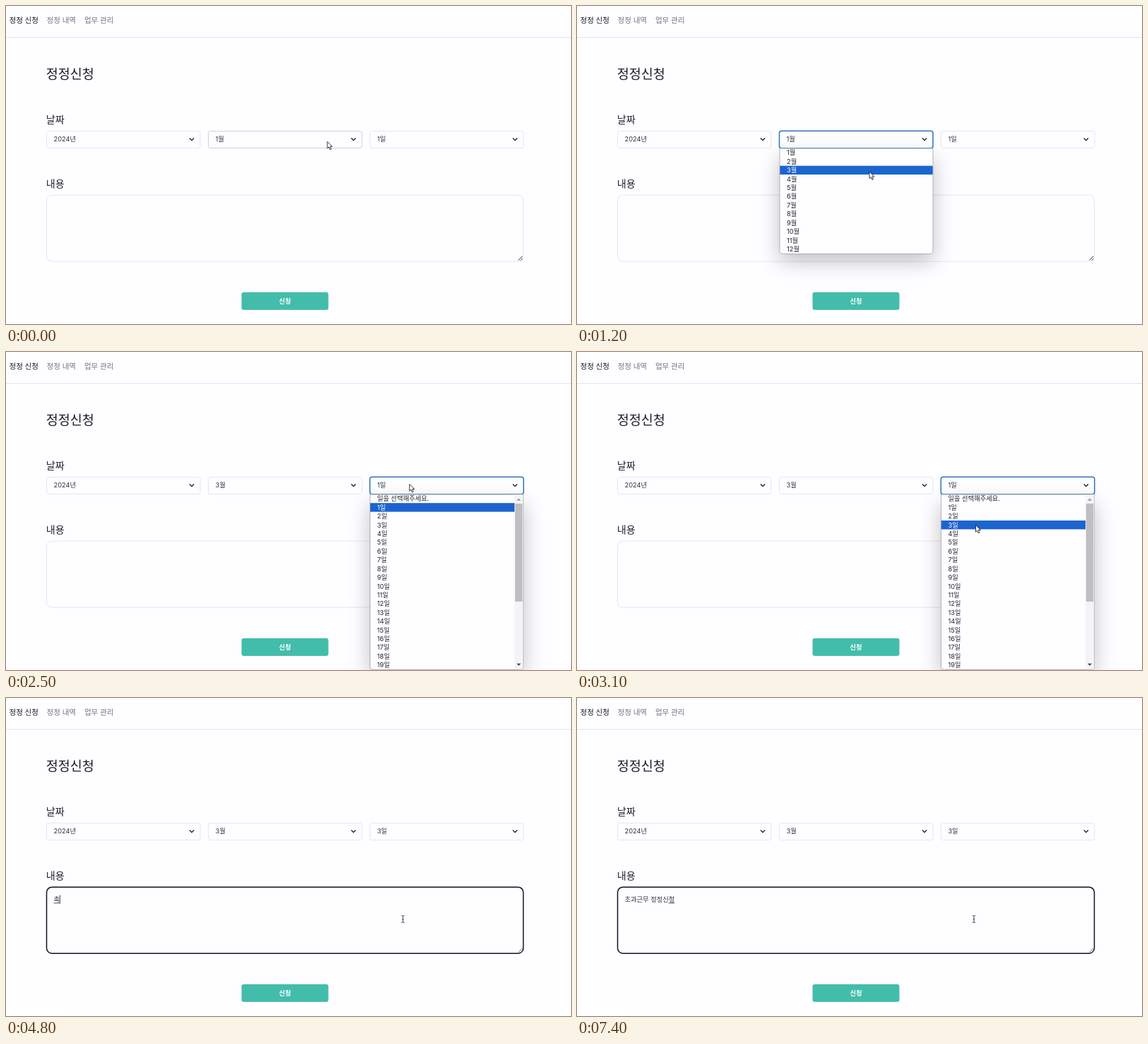
Recreate the animation shown at these times as an HTML page. Size 800 by 451 pixels, loop 8 s.

```html
<!DOCTYPE html>
<html lang="ko">
<head>
<meta charset="utf-8">
<title>정정신청</title>
<style>
  html, body { margin: 0; width: 100%; height: 100%; overflow: hidden; background: #fefdff; }
  svg { display: block; width: 100vw; height: 100vh; }
  text { font: 9.25px Inter, "Noto Sans CJK KR", sans-serif; fill: #2d3340; white-space: pre; }
  .nav { font-size: 10.5px; font-weight: 500; fill: #6f7480; }
  .nav.on { fill: #15171c; }
  .title { font-size: 18.5px; fill: #1a1c22; }
  .label { font-size: 14.1px; fill: #1f2128; }
  .button { font-weight: 700; fill: #fff; text-anchor: middle; }
  .item { fill: #26272b; }
  .item.on { fill: #fff; }
</style>
</head>
<body>
<svg id="stage" viewBox="0 0 800 451" preserveAspectRatio="none">
  <defs>
    <filter id="blur" x="-40%" y="-40%" width="180%" height="190%">
      <feGaussianBlur stdDeviation="15"/>
    </filter>
  </defs>
</svg>
<script>
const LOOP = 8000, STEP = 100, PITCH = 12.41, LIST_TOP = 202;
const stage = document.getElementById('stage');

function add(parent, tag, attrs, text) {
  const el = document.createElementNS('http://www.w3.org/2000/svg', tag);
  for (const key in attrs) el.setAttribute(key, attrs[key]);
  if (text !== undefined) el.textContent = text;
  parent.append(el);
  return el;
}
const set = (el, attrs) => { for (const key in attrs) el.setAttribute(key, attrs[key]); };
const show = (el, on) => el.setAttribute('visibility', on ? 'visible' : 'hidden');
const label = (parent, cls, x, y, text) => add(parent, 'text', { class: cls, x, y }, text);

// Page header and labels
label(stage, 'nav on', 4.5, 24.3, '정정 신청');
label(stage, 'nav', 57.6, 24.3, '정정 내역');
label(stage, 'nav', 110.9, 24.3, '업무 관리');
add(stage, 'rect', { x: 0, y: 44, width: 800, height: 1, fill: '#e3e4ea' });
label(stage, 'title', 56.7, 102.7, '정정신청');
label(stage, 'label', 56.8, 165.6, '날짜');
label(stage, 'label', 56.8, 256.6, '내용');

// Date selects
function makeSelect(x) {
  const box = { x: x + .5, y: 177.5, width: 217.5, height: 24, rx: 3 };
  const frame = add(stage, 'rect', { ...box, fill: '#fefdff', 'stroke-width': 1 });
  const ring = add(stage, 'rect', { ...box, y: 177.2, height: 24.5, fill: 'none', stroke: '#3178b8', 'stroke-width': 1.5 });
  const value = label(stage, '', x + 10.6, 192.4, '');
  add(stage, 'path', {
    d: `M${x + 203.3} 187.8l2.7 2.8 2.7-2.8`, fill: 'none', stroke: '#17191e',
    'stroke-width': 1.3, 'stroke-linecap': 'round', 'stroke-linejoin': 'round'
  });
  return { x, frame, ring, value };
}
const selects = [57, 286, 514.8].map(makeSelect);

// Text area
const area = add(stage, 'rect', { x: 57.5, y: 268.2, width: 675, height: 94, rx: 7.5, fill: '#fefdff' });
const grip = add(stage, 'path', { d: 'M725.5 360.6l5.6-5.6M728.7 360.9l2.6-2.6', fill: 'none', 'stroke-width': 1 });
const typed = label(stage, '', 67.6, 288.9, '');
const underline = add(stage, 'rect', { y: 290.4, height: .9, fill: '#3a3d45' });
const caret = add(stage, 'rect', { y: 279.5, width: .9, height: 12, fill: '#26282e' });

// Submit button
add(stage, 'rect', { x: 333.5, y: 406, width: 123, height: 25, rx: 3.2, fill: '#43bdab' });
label(stage, 'button', 395.1, 421.8, '신청');

// Drop-down lists
function makeList(x, height, names, itemWidth) {
  const g = add(stage, 'g', {});
  const box = { x, y: LIST_TOP, width: 217, height };
  add(g, 'rect', { ...box, y: LIST_TOP + 14, height: height - 4, fill: '#000', opacity: .25, filter: 'url(#blur)' });
  add(g, 'path', {
    d: `M${x} ${LIST_TOP}h217v${height - 5}q0 5-5 5h-207q-5 0-5-5z`,
    fill: '#fefdff', stroke: '#a5a5aa', 'stroke-width': .8
  });
  const bar = add(g, 'rect', { x: x + .3, width: itemWidth, height: PITCH, fill: '#1c64cf' });
  const items = names.map((name, i) => label(g, 'item', x + 10, LIST_TOP + 9.4 + i * PITCH, name));
  return { g, bar, items };
}
const count = (n, unit) => Array.from({ length: n }, (_, i) => i + 1 + unit);
const months = makeList(287, 149.6, count(12, '월'), 216.4);
const days = makeList(515.5, 248.4, ['일을 선택해주세요.', ...count(19, '일')], 204.2);

// Scroll bar of the day list
add(days.g, 'path', { d: 'M720 202.4h12.2v243q0 4.6-4.6 4.6h-7.6z', fill: '#f4f3f5' });
add(days.g, 'rect', { x: 720.8, y: 215, width: 10.4, height: 139, fill: '#bfbec0' });
add(days.g, 'path', { d: 'M723 210.8l3-3.2 3 3.2z', fill: '#98989b' });
add(days.g, 'path', { d: 'M723 441.8l3 3.2 3-3.2z', fill: '#48484b' });

// Pointers
const arrow = add(stage, 'path', {
  d: 'M0 0V9.6L2.2 7.6 3.8 11.3 5.5 10.6 3.9 7H7z',
  fill: '#fff', stroke: '#222', 'stroke-width': .9, 'stroke-linejoin': 'round'
});
const beam = add(stage, 'path', {
  d: 'M559.8 308.5q2 0 2.2 1.2 .2-1.2 2.2-1.2M562 309.5v8M559.8 318.6q2 0 2.2-1.2 .2 1.2 2.2 1.2M560.9 313.8h2.2',
  fill: 'none', stroke: '#333', 'stroke-width': .9
});

// [start, end, x, y]: each move begins where the previous one stopped
const moves = [
  [0, 0, 455, 192.3],
  [900, 1200, 414, 235],
  [1600, 2000, 571.3, 187.5],
  [2500, 3100, 564.5, 245.5]
];
function pointer(t) {
  let [, , x, y] = moves[0];
  for (const [start, end, toX, toY] of moves.slice(1)) {
    if (t <= start) break;
    const p = Math.min(1, (t - start) / (end - start));
    x += (toX - x) * p;
    y += (toY - y) * p;
  }
  return { x, y };
}

// Syllables as the input method composes them
const typing = [
  [0, ''], [4600, 'ㅊ'], [4700, '초'], [4800, '촉'], [4900, '초고'], [5000, '초과'], [5200, '초곽'],
  [5700, '초과근'], [5800, '초과근무'], [5900, '초과근무 ㅈ'], [6000, '초과근무 저'],
  [6200, '초과근무 정'], [6300, '초과근무 정ㅈ'], [6500, '초과근무 정정'], [6600, '초과근무 정정ㅅ'],
  [7000, '초과근무 정정시'], [7200, '초과근무 정정신'], [7300, '초과근무 정정신처'], [7400, '초과근무 정정신청']
];

function drawList(list, open, y, first) {
  show(list.g, open);
  const active = Math.max(first, Math.floor((y - LIST_TOP) / PITCH));
  list.bar.setAttribute('y', LIST_TOP - .2 + active * PITCH);
  list.items.forEach((item, i) => item.setAttribute('class', i === active ? 'item on' : 'item'));
}

function drawSelects(t, pos, listOpen) {
  const values = ['2024년', t < 1600 ? '1월' : '3월', t < 3300 ? '1일' : '3일'];
  const fade = Math.max(0, Math.min(1, (4100 - t) / 300));
  const rings = [0, t >= 100 && t < 2500 ? 1 : 0, t >= 2500 ? fade : 0];
  selects.forEach((s, i) => {
    const hover = !listOpen && t < 3700 && pos.y > 177 && pos.y < 202 && pos.x > s.x && pos.x < s.x + 218;
    s.frame.setAttribute('stroke', hover ? '#cdd2db' : '#e5e7ee');
    s.ring.setAttribute('opacity', rings[i]);
    s.value.textContent = values[i];
  });
}

function drawArea(t) {
  const focus = t >= 3700;
  set(area, { stroke: focus ? '#121318' : '#e5e6ed', 'stroke-width': focus ? 1.5 : 1 });
  grip.setAttribute('stroke', focus ? '#77787d' : '#2b2c30');
  const text = typing.filter(([start]) => start <= t).pop()[1];
  typed.textContent = text;
  const end = 67.6 + (text ? typed.getComputedTextLength() : 0);
  const last = text ? typed.getSubStringLength(text.length - 1, 1) : 0;
  set(underline, { x: end - last, width: last });
  caret.setAttribute('x', end - .3);
  show(caret, t >= 3900 && t < 7400);
}

function draw(t) {
  const pos = pointer(t);
  const monthOpen = t >= 100 && t < 1600;
  const dayOpen = t >= 2500 && t < 3300;
  drawSelects(t, pos, monthOpen || dayOpen);
  drawList(months, monthOpen, pos.y, 0);
  drawList(days, dayOpen, pos.y, 1);
  drawArea(t);
  arrow.setAttribute('transform', `translate(${pos.x} ${pos.y})`);
  show(arrow, t < 3700);
  show(beam, t >= 3700);
}

const begin = performance.now();
function tick() {
  const t = (performance.now() - begin) % LOOP;
  draw(Math.floor(t / STEP) * STEP);
  requestAnimationFrame(tick);
}
tick();
</script>
</body>
</html>
```
